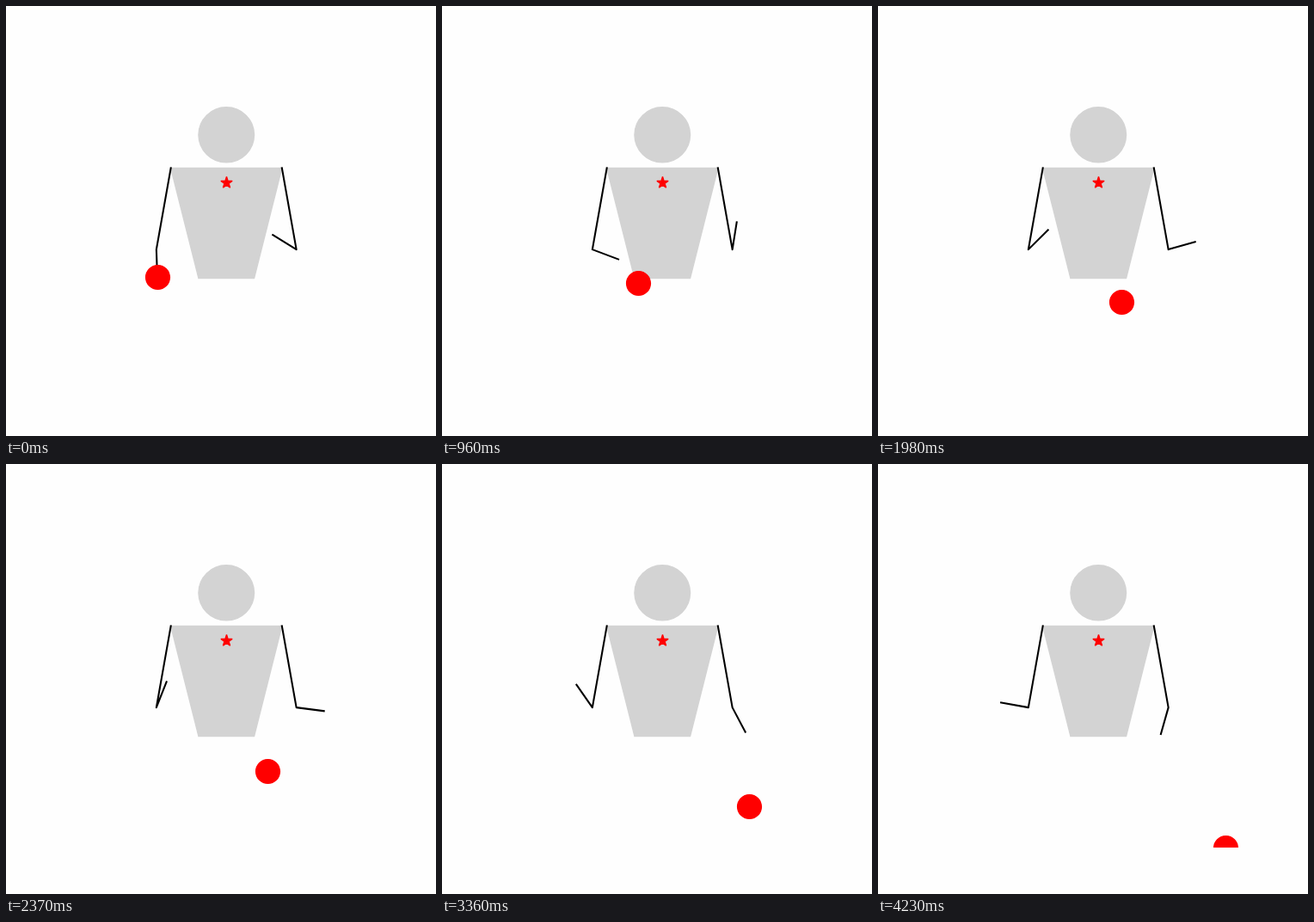
An HTML page with a canvas for the animation above (4260 ms loop, 500 by 500 pixels).

```html
<!DOCTYPE html>
<html lang="en">
<head>
<meta charset="utf-8">
<title>Throwing figure</title>
<style>
html, body { margin: 0; width: 100%; height: 100%; overflow: hidden; background: #fefefe; }
canvas { display: block; }
</style>
</head>
<body>
<canvas id="stage" width="500" height="500"></canvas>
<script>
const ctx = document.getElementById("stage").getContext("2d");
const STEP = 30, STEPS = 142;
const UX = 32.29, UY = 32.08;   // pixels per unit
const PT = 100 / 72;            // pixels per point
const RAD = Math.PI / 180;
const GREY = "#d3d3d3", RED = "#ff0000";

const px = x => 256.25 + x * UX;
const py = y => 252.5 - y * UY;

function paint(color) {
  ctx.fillStyle = ctx.strokeStyle = color;
  ctx.lineWidth = PT;
  ctx.fill();
  ctx.stroke();
}

function polygon(points) {
  ctx.beginPath();
  for (const [x, y] of points) ctx.lineTo(x, y);
  ctx.closePath();
}

function body() {
  ctx.lineJoin = "miter";
  polygon([[-2, 2], [2, 2], [1, -2], [-1, -2]].map(([x, y]) => [px(x), py(y)]));
  paint(GREY);
  ctx.beginPath();
  ctx.ellipse(px(0), py(3.2), UX, UY, 0, 0, 2 * Math.PI);
  paint(GREY);
}

function star(x, y, r) {
  const points = [];
  for (let i = 0; i < 10; i++) {
    const a = (i * 36 - 90) * RAD, d = i % 2 ? r * 0.382 : r;
    points.push([x + d * Math.cos(a), y + d * Math.sin(a)]);
  }
  ctx.lineJoin = "bevel";
  polygon(points);
  paint(RED);
}

// side is -1 or 1; angle is clockwise from the positive x axis
function arm(side, angle) {
  const ex = side * (2 + 3 * Math.cos(80 * RAD));
  const ey = 2 - 3 * Math.sin(80 * RAD);
  const a = angle * RAD;
  ctx.beginPath();
  ctx.moveTo(px(side * 2), py(2));
  ctx.lineTo(px(ex), py(ey));
  ctx.lineTo(px(ex + Math.cos(a)), py(ey - Math.sin(a)));
  ctx.strokeStyle = "#000";
  ctx.lineWidth = 1.5 * PT;
  ctx.lineJoin = "round";
  ctx.lineCap = "square";
  ctx.stroke();
}

function ball(n) {
  const x = Math.round(176.35 + 1.6145 * n) + 0.5;
  const y = Math.round(315.2 + 0.02 * n + 0.006416 * n * n) + 0.5;
  ctx.save();
  ctx.beginPath();
  ctx.rect(62, 60, 388, 386);
  ctx.clip();
  ctx.beginPath();
  ctx.arc(x, y, 10 * PT, 0, 2 * Math.PI);
  paint(RED);
  ctx.restore();
}

function draw(time) {
  const n = Math.floor(time / STEP + 0.001) % STEPS;
  ctx.fillStyle = "#fefefe";
  ctx.fillRect(0, 0, 500, 500);
  body();
  arm(-1, 88 - 2.18 * n + 0.0025 * n * n);
  arm(1, -148 + 2.18 * n - 0.0027 * n * n);
  star(256.5, 205.5, 5 * PT);
  ball(n);
}

function loop(now) {
  draw(now);
  requestAnimationFrame(loop);
}

draw(0);
requestAnimationFrame(loop);
</script>
</body>
</html>
```
